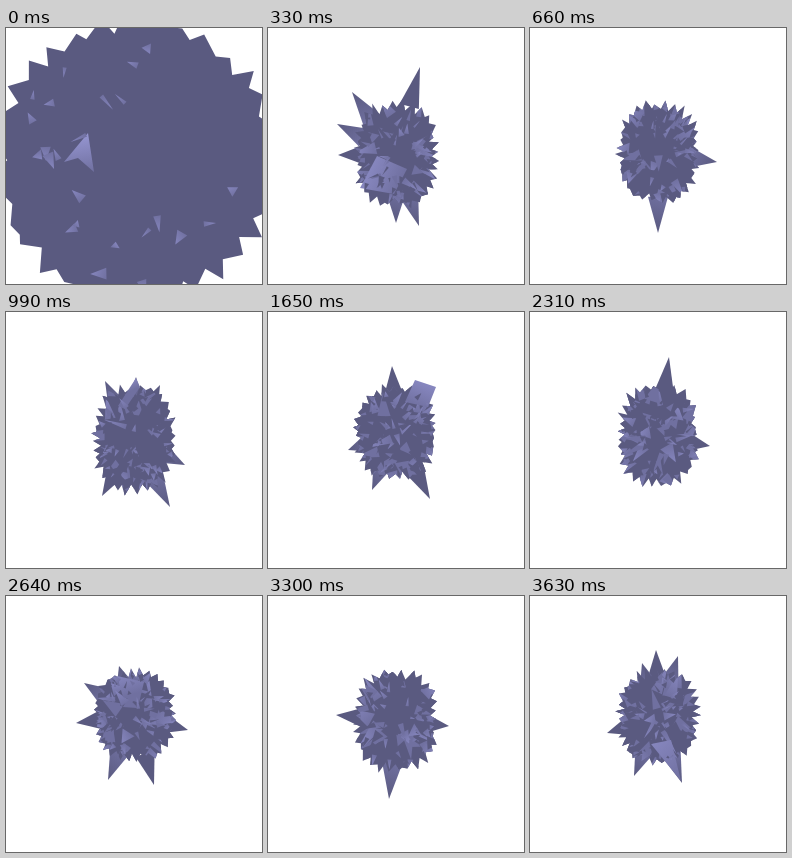
An HTML page with a canvas that plays this animation: 256x256 px, repeating every 3.96 s.

```html
<!DOCTYPE html>
<html lang="en">
<head>
<meta charset="utf-8">
<title>Shattering sphere</title>
<style>
  html, body { margin: 0; width: 100%; height: 100%; overflow: hidden; background: #fff; }
  canvas { display: block; width: 100vw; height: 100vh; }
</style>
</head>
<body>
<canvas width="256" height="256"></canvas>
<script>
const ctx = document.querySelector('canvas').getContext('2d');
const STEP = 330, TURN = 2 * Math.PI;
const DARK = '#5a5a80', MID = '#7070a0', LIGHT = '#8686be', PALE = '#9696d2';

// The longest spikes of each pose, its brightest plate and the foot of its body.
const poses = [
  { plate: '82,105 58,134 72,130 88,144' },
  { tips: '152,39 84,64 69,96 70,127 151,198 128,195', plate: '109,128 92,160 126,166 139,141', foot: 176 },
  { tips: '187,134 128,205' },
  { tips: '99,69 130,65 154,73 179,153 164,195 96,184', plate: '130,66 112,94 119,97 134,75', foot: 178 },
  { tips: '177,130 120,193' },
  { tips: '124,54 80,138 162,187 104,178', plate: '147,68 168,75 160,95 137,90', foot: 165 },
  { tips: '200,127 192,169 150,188 75,138 152,68', plate: '138,109 184,101 182,122 146,132', foot: 175 },
  { tips: '139,45 180,134' },
  { tips: '78,87 70,127 102,184 148,189 182,134 113,70', plate: '111,80 138,86 133,107 117,101', foot: 162 },
  { tips: '74,119 178,130' },
  { tips: '68,119 121,203 181,130' },
  { tips: '126,54 148,60 77,137 152,187 104,180 112,67', plate: '121,148 141,144 151,185', foot: 165 }
];

const seeded = seed => () => {
  seed = (seed + 0x6d2b79f5) | 0;
  let t = Math.imul(seed ^ (seed >>> 15), 1 | seed);
  t = (t + Math.imul(t ^ (t >>> 7), 61 | t)) ^ t;
  return ((t ^ (t >>> 14)) >>> 0) / 4294967296;
};
const points = text => text ? text.split(' ').map(pair => pair.split(',').map(Number)) : [];

function trace(corners) {
  ctx.beginPath();
  corners.forEach(([x, y]) => ctx.lineTo(x, y));
  ctx.closePath();
}

// A facet fades from its first corner to its last.
function facet(corners, from, to) {
  const shade = ctx.createLinearGradient(...corners[0], ...corners.at(-1));
  shade.addColorStop(0, from);
  shade.addColorStop(1, to);
  trace(corners);
  ctx.fillStyle = shade;
  ctx.fill();
}

function shard(x, y, angle, length, width, from, to) {
  const c = Math.cos(angle), s = Math.sin(angle);
  facet([[x + c * length, y + s * length], [x - s * width, y + c * width], [x + s * width, y - c * width]], from, to);
}

// A jagged superellipse; a higher power makes it squarer.
function jagged(rand, { cx, cy, rx, ry }, count, power, rough) {
  return Array.from({ length: count }, (_, n) => {
    const angle = (n + rand() * 0.7) * TURN / count, c = Math.cos(angle), s = Math.sin(angle);
    const edge = (Math.abs(c / rx) ** power + Math.abs(s / ry) ** power) ** (-1 / power);
    const reach = edge * (1 + rough * ((n % 2 ? 0.5 : -0.5) + rand() - 0.5));
    return [cx + c * reach, cy + s * reach];
  });
}

function scatter(rand, { cx, cy, rx, ry }, count, size) {
  for (let i = 0; i < count; i++) {
    const turn = rand() * TURN, far = Math.sqrt(rand());
    const from = rand() < 0.55 ? DARK : rand() < 0.45 ? MID : LIGHT;
    shard(cx + rx * far * Math.cos(turn), cy + ry * far * Math.sin(turn), turn + (rand() - 0.5) * 1.6,
      size * (0.5 + rand()), size * (0.12 + rand() * 0.28), from, from === LIGHT ? MID : from);
  }
}

function drawWhole(rand, plate) {
  facet(jagged(rand, { cx: 130, cy: 133, rx: 139, ry: 139 }, 64, 2, 0.08), DARK, DARK);
  facet(plate, PALE, MID);
  for (let i = 0; i < 24; i++) {
    const turn = rand() * TURN, far = 45 + 75 * Math.sqrt(rand());
    shard(122 + far * Math.cos(turn), 135 + far * Math.sin(turn), rand() * TURN, 6 + rand() * 12, 2 + rand() * 4, LIGHT, MID);
  }
}

function drawBurst(rand, { tips, plate, foot = 172 }) {
  const top = 77, body = { cx: 128, cy: (top + foot) / 2, rx: 38, ry: (foot - top) / 2 };
  const outline = jagged(rand, body, 64, 2.7, 0.14);
  points(tips).forEach(([x, y]) => {
    const dx = x - body.cx, dy = y - body.cy;
    shard(x - dx * 0.45, y - dy * 0.45, Math.atan2(dy, dx), Math.hypot(dx, dy) * 0.45, 10, DARK, rand() < 0.5 ? DARK : MID);
  });
  facet(outline, DARK, DARK);
  ctx.save();
  trace(outline);
  ctx.clip();
  scatter(rand, body, 75, 19);
  ctx.restore();
  if (plate) facet(points(plate), LIGHT, MID);
  ctx.save();
  trace(outline);
  ctx.clip();
  scatter(rand, body, 60, 8);
  ctx.restore();
}

function draw(step) {
  const rand = seeded(step * 97 + 5), pose = poses[step];
  ctx.clearRect(0, 0, 256, 256);
  if (step) drawBurst(rand, pose);
  else drawWhole(rand, points(pose.plate));
}

let shown = -1;
function tick() {
  const step = Math.floor(performance.now() / STEP) % poses.length;
  if (step !== shown) draw(shown = step);
  requestAnimationFrame(tick);
}
tick();
</script>
</body>
</html>
```
